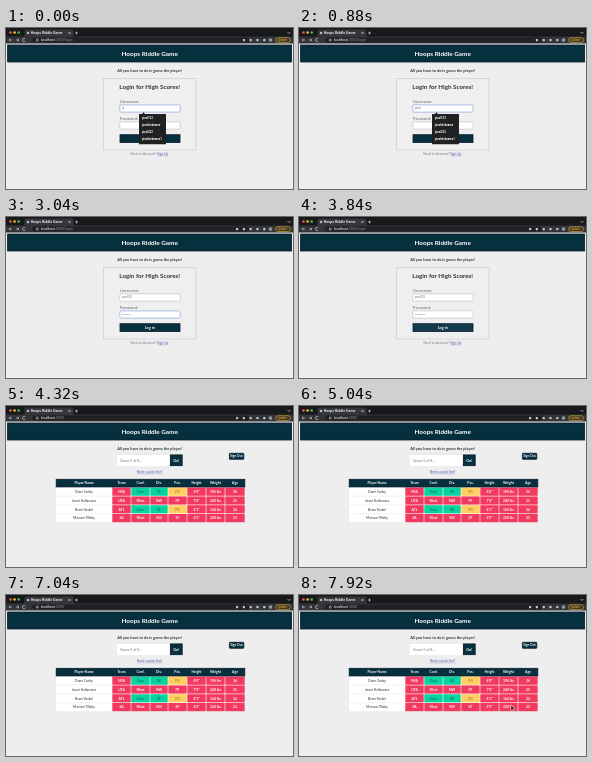
Animation, 287 px wide and 161 px high, one loop 8000 ms. Source, as an HTML page:

```html
<!DOCTYPE html>
<html lang="en">
<head>
<meta charset="utf-8">
<title>Hoops Riddle Game</title>
<style>
html, body { margin: 0; width: 100%; height: 100%; overflow: hidden; background: #eee; }
svg { display: block; width: 100vw; height: 100vh; }
text { font-family: Lato, "Open Sans", sans-serif; fill: #303438; }
.b { font-weight: 700; }
.m { text-anchor: middle; }
.ui { font-family: Roboto, Inter, sans-serif; }
.w { fill: #fff; }
.label { fill: #65696d; }
.link { fill: #5560b0; }
.under { stroke: #7b84c4; stroke-width: .4; }
.dark { fill: #07303f; stroke: #0a1a2c; stroke-width: .8; }
.soft { filter: drop-shadow(0 .5px .7px rgba(0, 0, 0, .22)); }
.line { fill: none; stroke: #c8cacd; stroke-width: .7; }
</style>
</head>
<body>
<svg viewBox="0 0 287 161" preserveAspectRatio="none">
  <rect width="287" height="161" fill="#eee"/>

  <g id="browser">
    <rect width="287" height="9" fill="#17191b"/>
    <path d="M17 9Q18.5 9 18.5 7V3Q18.5 1.5 20 1.5H66Q67.5 1.5 67.5 3V7Q67.5 9 69 9Z" fill="#35363a"/>
    <rect y="8.5" width="287" height="7" fill="#323438"/>
    <circle cx="4.5" cy="4.5" r="1.3" fill="#f25b53"/>
    <circle cx="8.6" cy="4.5" r="1.3" fill="#f4bd38"/>
    <circle cx="12.7" cy="4.5" r="1.3" fill="#4ac24a"/>
    <circle cx="22" cy="5" r="1.3" fill="#a9bdc5"/>
    <text class="ui w" x="24.7" y="6.2" font-size="3.6" font-weight="500">Hoops Riddle Game</text>
    <path class="line" d="M62.5 4l2 2m0-2l-2 2M69 5h3m-1.5-1.5v3M281.5 4l1.5 1.5L284.5 4"/>
    <path class="line" d="M6 12H3m1.3-1.3L3 12l1.3 1.3M10 12h3m-1.3-1.3L13 12l-1.3 1.3M19.3 11a1.6 1.6 0 1 0 0 2"/>
    <rect x="26" y="9.6" width="217" height="5" rx="2.5" fill="#202124"/>
    <circle cx="31.3" cy="12.1" r="1" class="line"/>
    <text class="ui w" x="34.7" y="13.3" font-size="3.5">localhost<tspan id="path" fill="#8d9094"></tspan></text>
    <g id="icons" fill="#c8cacd"></g>
    <rect x="269.5" y="9.7" width="15" height="4.8" rx="2.4" fill="#3d3524" stroke="#e3ad37" stroke-width=".6"/>
    <text class="ui" x="271.5" y="13.2" font-size="3" style="fill:#f1bd4a">Update</text>
  </g>

  <rect class="dark" x="1.6" y="17" width="284" height="17"/>
  <text class="b m w" x="143.7" y="27.6" font-size="6.4">Hoops Riddle Game</text>
  <text class="b m" x="143.7" y="43.6" font-size="3.9">All you have to do is guess the player!</text>

  <g id="login">
    <rect x="97.5" y="50.5" width="92.5" height="71.5" fill="#efeff0" stroke="#d0d1d4" stroke-width=".8"/>
    <text class="b m" x="143.7" y="60.6" font-size="6.25">Login for High Scores!</text>
    <text class="label" x="113.8" y="74.8" font-size="4.1">Username:</text>
    <text class="label" x="113.8" y="91.8" font-size="4.1">Password:</text>
    <rect id="userBox" class="soft" x="114" y="77" width="60" height="7" rx=".8" fill="#fff" stroke-width=".7"/>
    <rect id="passBox" class="soft" x="114" y="94" width="60" height="7" rx=".8" fill="#fff" stroke-width=".7"/>
    <text class="ui label" id="user" x="116" y="81.4" font-size="2.7"></text>
    <g id="dots" fill="#666"></g>
    <rect id="button" class="dark" x="114" y="106.7" width="60" height="7.8"/>
    <text class="b m w" x="143.8" y="112" font-size="3.9">Log in</text>
    <text class="m" x="143.3" y="127" font-size="3.3" style="fill:#7b7f84">Need an Account? <tspan class="link">Sign Up</tspan></text>
    <path class="under" d="M151.3 127.8H162.2"/>
    <g id="menu">
      <path id="menuBox" fill="#202123"/>
      <g id="items"></g>
    </g>
  </g>

  <g id="game">
    <rect class="soft" x="111" y="48.5" width="52.5" height="11.5" fill="#fff"/>
    <text x="114" y="55.5" font-size="3.5" style="fill:#70757b">Guess 5 of 8...</text>
    <rect class="dark" x="164.4" y="48.9" width="11.8" height="10.8"/>
    <text class="b m w" x="170.2" y="55.6" font-size="3.9">Go!</text>
    <text class="m link" x="143.6" y="67" font-size="3.2">Need a quick hint?</text>
    <path class="under" d="M130.8 67.8H156.4"/>
    <rect class="dark" x="223.4" y="47.3" width="14.4" height="6" rx=".6"/>
    <text class="b m w" x="230.5" y="51.4" font-size="3.2">Sign Out</text>
    <rect class="soft" x="50" y="73" width="189" height="43.6" fill="#fff"/>
    <g id="table"></g>
    <path id="cursor" d="M0 0V5.2L1.2 4.1 2.1 6 3 5.6 2.1 3.8H3.7Z" fill="#111" stroke="#fff" stroke-width=".4"/>
  </g>
</svg>

<script>
const LOOP = 8000, ENTER = 4320;
const $ = id => document.getElementById(id);

function add(parent, tag, attrs, text) {
  const el = document.createElementNS('http://www.w3.org/2000/svg', tag);
  for (const k in attrs) el.setAttribute(k, attrs[k]);
  if (text) el.textContent = text;
  return parent.appendChild(el);
}

const RED = '#f23a61', GREEN = '#08d2a0', YELLOW = '#ffcf61';
const INK = { [RED]: '#fff', [GREEN]: '#087c64', [YELLOW]: '#b8792b' };
const edges = [50, 106, 125, 144, 162, 181, 200, 219, 239];
const heads = ['Player Name', 'Team', 'Conf.', 'Div.', 'Pos.', 'Height', 'Weight', 'Age'];
const rows = [
  ['Dane Corby', 'MIA', 'East', 'SE', 'PG', '6\'0"', '196 lbs', '36'],
  ['Jouni Hallavaara', 'UTA', 'West', 'NW', 'PF', '7\'0"', '240 lbs', '25'],
  ['Bram Yoskel', 'ATL', 'East', 'SE', 'PG', '6\'1"', '164 lbs', '24'],
  ['Marvon Tillsby', 'SA', 'West', 'SW', 'SF', '6\'5"', '220 lbs', '23']
];
const cellColor = v =>
  v === 'East' || v === 'SE' ? GREEN : v === 'PG' ? YELLOW : RED;

function cell(col, y, h, label, bg, ink, bold) {
  const x = edges[col], w = edges[col + 1] - x;
  add($('table'), 'rect', { x: x + .3, y: y + .3, width: w - .6, height: h - .6, fill: bg });
  add($('table'), 'text', {
    x: x + w / 2, y: y + h / 2 + 1.2, 'font-size': 3.4,
    class: bold ? 'm b' : 'm', style: 'fill:' + ink
  }, label);
}

add($('table'), 'rect', { x: 50.2, y: 73.3, width: 188.6, height: 7.8, class: 'dark' });
heads.forEach((h, c) => cell(c, 73, 8.3, h, 'none', '#fff', true));
rows.forEach((row, r) => row.forEach((v, c) => {
  const bg = c ? cellColor(v) : '#fff';
  cell(c, 81.3 + r * 8.8, 8.8, v, bg, c ? INK[bg] : '#30343a', c > 0);
}));
for (let r = 1; r < 4; r++)
  add($('table'), 'path', { d: `M50 ${81.3 + r * 8.8}H106`, stroke: '#ddd', 'stroke-width': .4 });

const icons = Array.from({ length: 5 }, (_, i) =>
  add($('icons'), 'rect', { x: 230 + i * 6.8, y: 11, width: 2.2, height: 2.2, rx: .6 }));
add($('icons'), 'circle', { cx: 264.5, cy: 12.1, r: 1.8, fill: '#8c9cb0' });

const items = ['pixel123', 'pixelnickname', 'pixel222', 'pixelnickname1'].map((name, i) =>
  add($('items'), 'text', { x: 136, y: 91.2 + i * 7, class: 'ui w b', 'font-size': 2.8 }, name));
const dots = Array.from({ length: 8 }, (_, i) =>
  add($('dots'), 'circle', { cx: 116.6 + i * 1.25, cy: 97.6, r: .45 }));

const show = (el, on) => el.setAttribute('display', on ? 'inline' : 'none');
const since = (t, start, step) => t < start ? 0 : Math.floor((t - start) / step) + 1;

function focus(el, on) {
  el.setAttribute('stroke', on ? '#a3b8f0' : '#d9dadc');
}

function draw(t) {
  const inGame = t >= ENTER;
  show($('login'), !inGame);
  show($('game'), inGame);
  $('path').textContent = inGame ? ':3000' : ':3000/login';

  const typed = Math.min(5, 2 + since(t, 240, 160)) + Math.min(3, since(t, 960, 120));
  $('user').textContent = 'pixel123'.slice(0, typed);
  const count = typed > 5 ? 1 : 4;
  items.forEach((el, i) => show(el, i < count));
  $('menuBox').setAttribute('d', `M133 86H136L137.5 84.3 139 86H160V${88.3 + count * 7}H133Z`);
  show($('menu'), t < 1200);

  focus($('userBox'), t < 1920);
  focus($('passBox'), t >= 1920 && t < 3600);
  const secret = since(t, 2080, 80) && Math.min(8, 2 + since(t, 2320, 160));
  dots.forEach((el, i) => show(el, i < secret));
  show(icons[0], t >= 1920);
  $('button').style.fill = t >= 3600 ? '#143c4d' : '';

  const p = Math.min(1, Math.max(0, (t - 7440) / 400));
  const ease = p * p * (3 - 2 * p);
  show($('cursor'), t >= 7440);
  $('cursor').setAttribute('transform', `translate(${226 - 14 * ease} ${103 + 7 * ease})`);
}

function tick() {
  draw(performance.now() % LOOP);
  requestAnimationFrame(tick);
}
tick();
</script>
</body>
</html>
```
